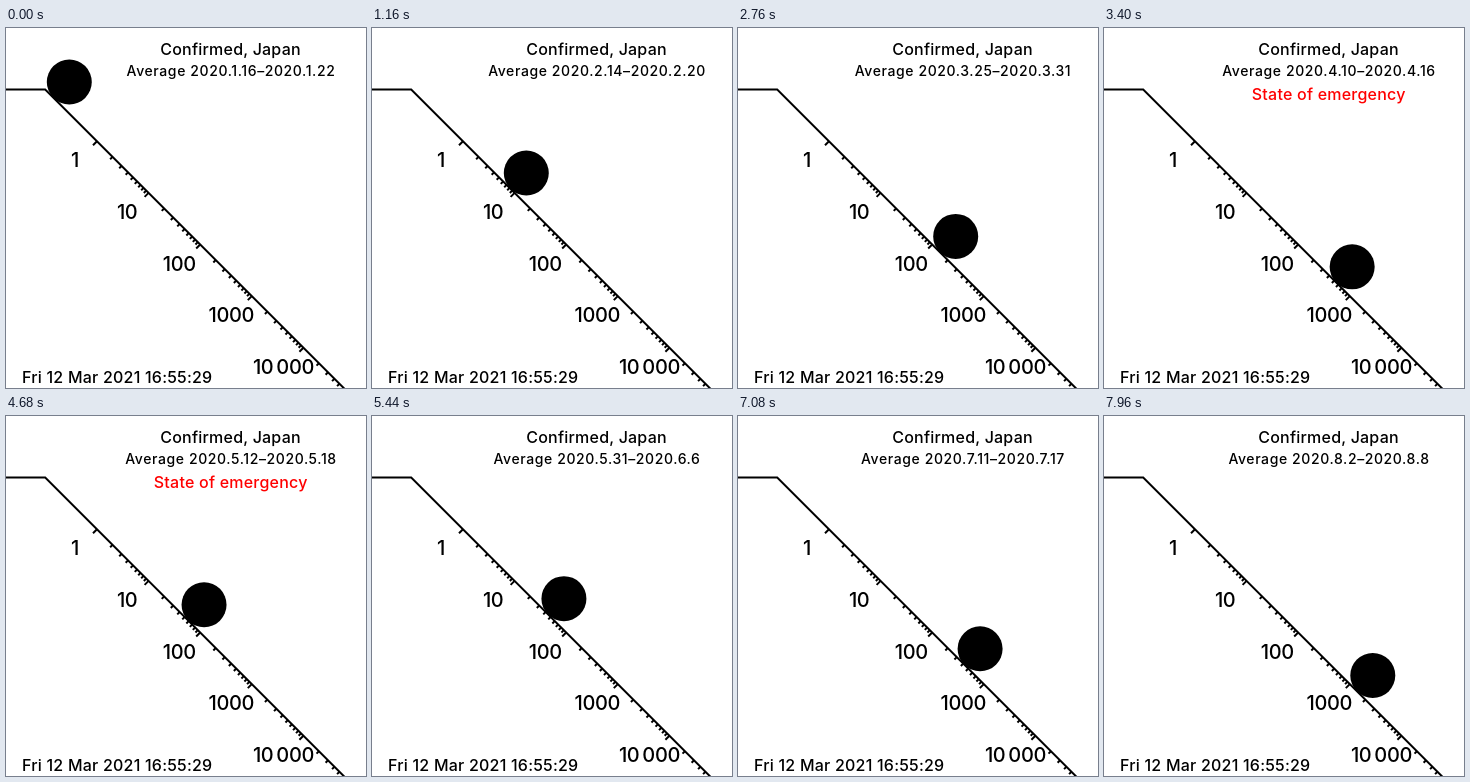
An HTML page for the animation above (8 s loop, 360x360 px).

```html
<!DOCTYPE html>
<html lang="en">
<head>
<meta charset="utf-8">
<style>
  html, body { margin: 0; width: 100%; height: 100%; overflow: hidden; background: #fff; }
  svg { display: block; width: 100%; height: 100%; font-family: Inter, sans-serif; font-weight: 450; }
  .axis { fill: none; stroke: #000; stroke-width: 2; }
  .centred { text-anchor: middle; }
  .spaced { font-size: 16px; letter-spacing: 0.22px; }
</style>
</head>
<body>
<svg viewBox="0 0 360 360">
  <path class="axis" d="M0 61.5H39.2L342 364.3"/>
  <path class="axis" id="ticks"/>
  <g class="centred" id="labels" font-size="20" letter-spacing="-0.4"></g>
  <text class="centred spaced" x="224.5" y="27">Confirmed, Japan</text>
  <text class="centred" id="period" x="225" y="48" font-size="14" letter-spacing="0.6"></text>
  <text class="centred spaced" id="emergency" x="224.7" y="72" fill="#f00">State of emergency</text>
  <text class="spaced" x="16" y="355">Fri 12 Mar 2021 16:55:29</text>
  <circle id="ball" r="22.5"/>
</svg>
<script>
const DAY_MS = 40, DAYS = 200;
const ORIGIN = { x: 91, y: 113.3 }, DECADE = 51.6;
const EMERGENCY = { first: 76, last: 124 };
const byId = id => document.getElementById(id);

// Turning points of the seven-day total: [day, cases].
const turns = [[0, 1], [1, 0.1], [2, 1], [9, 10], [14, 9], [16, 4], [20, 1], [21, 1],
  [23, 13], [29, 58], [40, 128], [52, 325], [62, 320], [70, 1153], [76, 2203], [84, 3960],
  [94, 2800], [104, 1560], [112, 548], [117, 409], [123, 220], [133, 335], [141, 275],
  [147, 350], [155, 434], [168, 1520], [181, 3900], [192, 8000], [199, 9600]];

// Growth is exponential between turning points, so it is linear on the log scale.
function logAverage(day) {
  const next = Math.max(1, turns.findIndex(([turnDay]) => turnDay >= day));
  const [[startDay, start], [endDay, end]] = turns.slice(next - 1, next + 1);
  const progress = (day - startDay) / (endDay - startDay);
  return Math.log10(start * (end / start) ** progress / 7);
}

function drawScale() {
  let path = "";
  for (let power = 0; power < 5; power++) {
    for (let digit = 1; digit < 10; digit++) {
      const shift = DECADE * (power + Math.log10(digit));
      const length = digit === 1 ? 4 : 2.4;
      path += `M${ORIGIN.x + shift} ${ORIGIN.y + shift}l${-length} ${length}`;
    }
    const label = document.createElementNS("http://www.w3.org/2000/svg", "text");
    label.setAttribute("x", 69 + 52.1 * power);
    label.setAttribute("y", 139 + 51.8 * power);
    label.textContent = power === 4 ? "10\u2009000" : 10 ** power;
    byId("labels").append(label);
  }
  byId("ticks").setAttribute("d", path);
}

function dateText(day) {
  const date = new Date(Date.UTC(2020, 0, 16 + day));
  return `${date.getUTCFullYear()}.${date.getUTCMonth() + 1}.${date.getUTCDate()}`;
}

function draw(now) {
  const day = Math.floor(now / DAY_MS) % DAYS;
  const shift = DECADE * logAverage(day);
  // The ball rests on the flat part when there are no cases.
  byId("ball").setAttribute("cx", Math.max(27.5, 106.9 + shift));
  byId("ball").setAttribute("cy", Math.max(38.8, 97.6 + shift));
  byId("period").textContent = `Average ${dateText(day)}–${dateText(day + 6)}`;
  const emergency = day >= EMERGENCY.first && day <= EMERGENCY.last;
  byId("emergency").style.display = emergency ? "" : "none";
  requestAnimationFrame(draw);
}

drawScale();
draw(performance.now());
</script>
</body>
</html>
```
